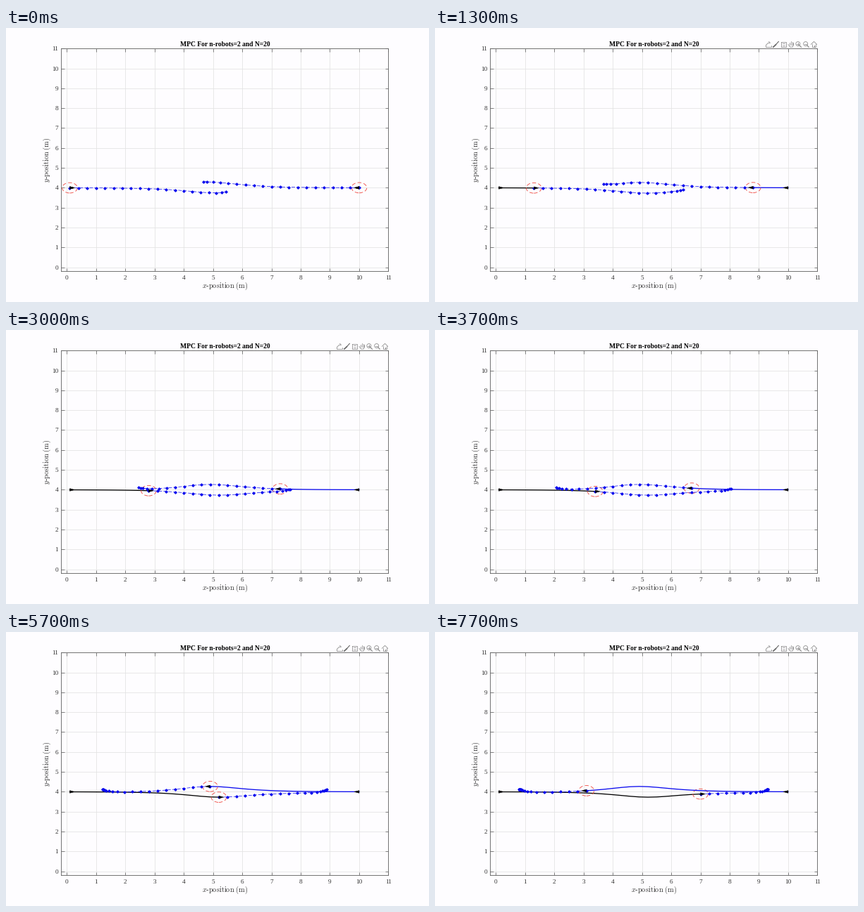
Recreate the animation shown at these times as a matplotlib script. Size 600 by 390 pixels, loop 8000 ms.

```python
import numpy as np
import matplotlib.pyplot as plt
from matplotlib.animation import FuncAnimation
from matplotlib.patches import Circle, Ellipse

W, H, DPI = 600, 390, 100
PX = 72 / DPI
STEPS, TICKS, HORIZON, STRIDE = 24, 80, 20, 0.3
PAPER, BLUE, RED = "#fefdff", "#0a0aee", "#f05048"
INK, LINE, GRID, ICON = "#303030", "#666666", "#e3e3e3", "#8c8c8c"
LEFT, RIGHT, TOP, BOTTOM = 78, 542.4, 29.2, 346.4
MEETING = 17 * STRIDE

plt.rcParams.update({"font.family": "Liberation Serif", "mathtext.fontset": "cm"})


def detour(travel, side):
    """Height after a distance travelled: a swerve that peaks where the robots meet."""
    rest = np.where(travel > MEETING, 3.96, 4.0)
    peak = 4 - 0.27 * side
    return rest + (peak - rest) / np.cosh((travel - MEETING) / 0.97)


def horizon(step):
    """Predicted travel with a braking tail, and the distance left to its end."""
    end = 9.5 - 3.88 * np.exp(-(step / 11.25) ** 1.32)
    travel = [STRIDE * step]
    for _ in range(HORIZON - 1):
        left = end - travel[-1]
        travel.append(travel[-1] + STRIDE * left / (left**4 + 0.9**4) ** 0.25)
    travel = np.array(travel)
    return travel, end - travel


def arrow(x, y, side):
    return [(x, y + 0.065), (x + 0.17 * side, y), (x, y - 0.065)]


fig = plt.figure(figsize=(W / DPI, H / DPI), dpi=DPI, facecolor=PAPER)
ax = fig.add_axes([LEFT / W, 1 - BOTTOM / H, (RIGHT - LEFT) / W, (BOTTOM - TOP) / H],
                  facecolor=PAPER)
ax.set(xlim=(-0.2, 11), ylim=(-0.2, 11), xticks=range(12), yticks=range(12))
ax.grid(color=GRID, lw=0.8 * PX)
ax.set_axisbelow(True)
ax.tick_params(direction="in", top=True, right=True, length=4.5 * PX, width=0.8 * PX,
               color=LINE, labelcolor=INK, labelsize=9.3 * PX)
ax.tick_params(axis="x", pad=5.5 * PX)
ax.tick_params(axis="y", pad=4 * PX)
for spine in ax.spines.values():
    spine.set(linewidth=0.9 * PX, color=LINE)

page = fig.add_axes([0, 0, 1, 1])
page.set(xlim=(0, W), ylim=(H, 0))
page.axis("off")
page.text(311, 25.5, "MPC For n-robots=2 and N=20", size=9.55 * PX, weight="bold",
          ha="center", va="baseline")
label = dict(size=10.3 * PX, ha="center", va="center", color=INK)
page.text(310.5, 367.4, r"$x$-$\mathrm{position}\ (\mathrm{m})$", **label)
page.text(58.4, 188, r"$y$-$\mathrm{position}\ (\mathrm{m})$", rotation=90, **label)

tools = []


def stroke(x, *points, width=0.8, color=ICON):
    """A line through points given relative to an icon's centre."""
    xs, ys = np.transpose(points)
    tools.extend(page.plot(x + xs, 23.3 + ys, color=color, lw=width * PX))


def magnifier(x):
    tools.append(page.add_patch(Circle((x - 1, 22.5), 3, fill=False, ec=ICON, lw=0.8 * PX)))
    stroke(x, (1.2, 1.5), (3.6, 4), width=1.2)
    stroke(x, (-2.5, -0.8), (0.5, -0.8))


export, brush, tip, hand, zoom_in, zoom_out, home = np.linspace(472.5, 537.5, 7)
stroke(export, (-4, 1), (-4, 3.5), (4, 3.5), (4, 1.5))
stroke(export, (-3, 1), (0, -2), (3, -2), (1, -4))
stroke(brush, (4, -4), (0, 0.5), color=LINE, width=1.1)
stroke(brush, (0, 0.5), (-3.5, 3.8), color=LINE, width=1.7)
stroke(tip, (-3, -3.5), (3.5, -3.5), (3.5, 3.5), (-3, 3.5), (-3, -3.5))
for row in (-1, 1.2):
    stroke(tip, (-1.5, row), (2, row))
for finger in (-2, -0.2, 1.6, 3.2):
    stroke(hand, (finger, 1), (finger, abs(finger) * 0.6 - 4))
stroke(hand, (-4, 0), (-1.5, 3.8), (2.2, 3.8), (3.2, 1))
magnifier(zoom_in)
magnifier(zoom_out)
stroke(zoom_in, (-1, -2.3), (-1, 0.7))
stroke(home, (-4.2, 0), (0, -4), (4.2, 0))
stroke(home, (-2.8, -0.8), (-2.8, 3.8), (2.8, 3.8), (2.8, -0.8))
stroke(home, (0, 1.2), (0, 3.8), width=1.2)


class Robot:
    def __init__(self, start, side, color):
        self.start, self.side = start, side
        ax.fill(*zip(*arrow(start, 4, side)), color="black", lw=0.3, zorder=4)
        self.trail, = ax.plot([], [], color=color, lw=1.3 * PX, zorder=3)
        self.plan, = ax.plot([], [], color=BLUE, lw=0.7 * PX, ls=(0, (7, 3)),
                             marker=(8, 2, 0), ms=4.6 * PX, mew=0.45 * PX, zorder=5)
        self.head, = ax.fill([0, 0, 0], [0, 0, 0], color="black", lw=0.3, zorder=6)
        self.zone = ax.add_patch(Ellipse((0, 0), 0.52, 0.52, fill=False, ec=RED,
                                         lw=0.9 * PX, ls=(0, (6, 3.5)), zorder=3))

    def place(self, travel):
        return self.start + self.side * travel, detour(travel, self.side)

    def update(self, step):
        travel, left = horizon(step)
        xs, ys = self.place(travel)
        self.plan.set_data(xs, ys + 0.17 * np.exp(-left / 0.25))
        trail = self.place(STRIDE * np.arange(step + 1))
        self.trail.set_data(*trail)
        x, y = trail[0][-1], trail[1][-1]
        self.head.set_xy(arrow(x, y, self.side))
        self.zone.set_center((x, y))


robots = [Robot(0.1, 1, "black"), Robot(10.0, -1, BLUE)]


def update(tick):
    step = sum(round(k * TICKS / STEPS) <= tick for k in range(1, STEPS))
    for robot in robots:
        robot.update(step)
    for part in tools:
        part.set_visible(1 <= step < 11 or step >= 15)
    return []


anim = FuncAnimation(fig, update, frames=TICKS, init_func=lambda: update(0),
                     interval=100, repeat=True, repeat_delay=0)
plt.show()
```
